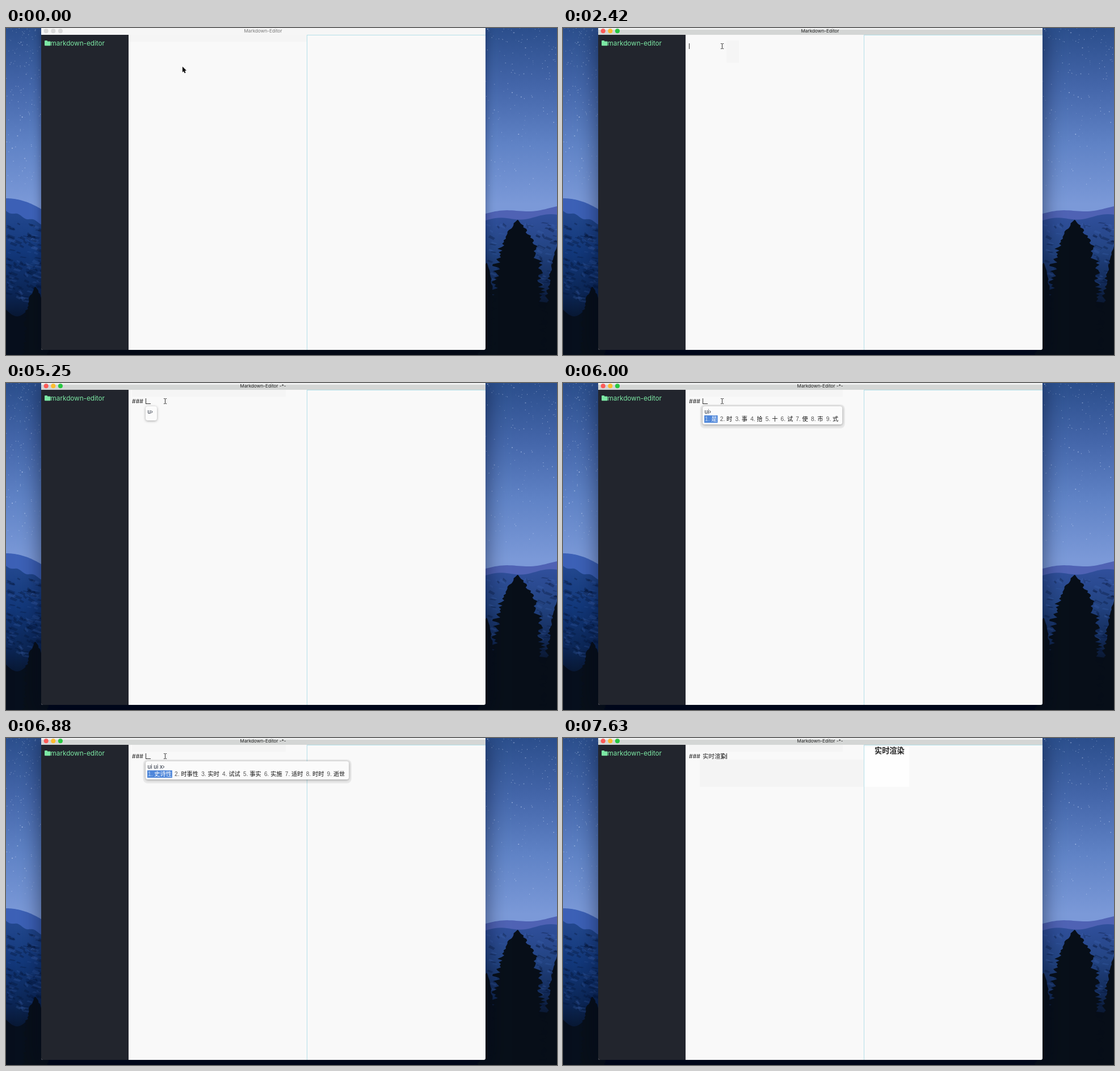
These frames come from a looping animation (971 px wide and 576 px high, 8000 ms). An HTML page with a canvas:

```html
<!DOCTYPE html>
<html lang="zh-CN">
<head>
<meta charset="utf-8">
<title>Markdown-Editor</title>
<style>
html, body { margin: 0; width: 100%; height: 100%; overflow: hidden; background: #050a14; }
canvas { display: block; }
</style>
</head>
<body>
<canvas id="stage" width="971" height="576"></canvas>
<script>
const LOOP = 8000;
const ctx = document.getElementById('stage').getContext('2d');
const UI = '"Liberation Sans", "Noto Sans CJK SC", "Noto Sans CJK", sans-serif';
const ROUND = 'Inter, "Noto Sans CJK SC", "Noto Sans CJK", sans-serif';

// Key moments in ms
const FOCUS = 150, ARRIVE = 790, HOVER = 1090, CLICK = 1380;
const TYPE = 2570, SPACE = 3170, COMPOSE = 5250, COMMIT = 7630;
const KEY_GAP = 150;
const HEADING = '实时渲染';

const pairs = '实时 试试 事实 实施 适时 时时 逝世';
const compositions = [
  [COMPOSE, 'u', ''],
  [5700, 'u', '是 上 说 时 事 谁 水 树 山'],
  [6000, 'ui', '是 时 事 拾 十 试 使 市 式'],
  [6290, 'ui u', `${pairs} 史诗 誓师`],
  [6440, 'ui ui', `${pairs} 史诗 誓师`],
  [6880, 'ui ui x', `史诗性 时事性 ${pairs}`],
  [7180, 'ui ui xr', `实时选 时事选 ${pairs}`],
  [7330, 'ui ui xr r', `${HEADING} ${pairs} 史诗`]
];

const clamp = (v, lo, hi) => Math.max(lo, Math.min(hi, v));

function seeded(seed) {
  return () => (seed = (seed * 16807) % 2147483647) / 2147483647;
}

function rect(color, x, y, w, h) {
  ctx.fillStyle = color;
  ctx.fillRect(x, y, w, h);
}

function rounded(color, x, y, w, h, r) {
  ctx.fillStyle = color;
  ctx.beginPath();
  ctx.roundRect(x, y, w, h, r);
  ctx.fill();
}

function poly(color, points) {
  ctx.fillStyle = color;
  ctx.beginPath();
  points.forEach(([x, y]) => ctx.lineTo(x, y));
  ctx.closePath();
  ctx.fill();
}

function text(string, x, y, font, color) {
  ctx.font = font;
  ctx.fillStyle = color;
  ctx.fillText(string, x, y);
}

function withShadow(color, blur, offset, paint) {
  ctx.save();
  ctx.shadowColor = color;
  ctx.shadowBlur = blur;
  ctx.shadowOffsetY = offset;
  paint();
  ctx.restore();
}

// Evenly spaced colour stops from top to bottom
function gradient(top, bottom, ...colors) {
  const g = ctx.createLinearGradient(0, top, 0, bottom);
  colors.forEach((color, i) => g.addColorStop(i / (colors.length - 1), color));
  return g;
}

// Fills everything below height(u), with u running 0..1 across the strip
function ridge(color, x, width, height) {
  const points = [[x + width, 576], [x, 576]];
  for (let i = 0; i <= 30; i++) points.push([x + width * i / 30, height(i / 30)]);
  poly(color, points);
}

function tree(random, x, top, maxHalf, reach) {
  const left = [], right = [];
  for (let y = top; y < 580; y += 3) {
    const half = 1 + maxHalf * (1 - Math.exp((top - y) / reach));
    left.unshift([x - half * (0.75 + random() * 0.4), y]);
    right.push([x + half * (0.75 + random() * 0.4), y + 1]);
  }
  poly('#070e18', [[x, top], ...right, ...left]);
}

function drawWallpaper() {
  const random = seeded(71);
  const anyX = i => i % 2 ? random() * 62 : 845 + random() * 126;

  rect(gradient(0, 310, '#2b4e8c', '#4466aa', '#6083c6', '#7b99d8'), 0, 0, 971, 330);
  for (let i = 0; i < 300; i++) {
    const size = random() < 0.15 ? 1.6 : 1;
    rect(`rgba(220,232,255,${0.15 + random() * 0.6})`, anyX(i), random() ** 1.5 * 285, size, size);
  }

  ridge('#3c60b6', 0, 62, u => 300 + 19 * u * u);
  ridge(gradient(322, 540, '#23488f', '#12377a', '#0b2555', '#050c18'), 0, 62, u => 322 + 22 * u + 2 * Math.sin(u * 14));
  ridge('#4f62b4', 845, 126, u => 327 - 11 * u - 3 * Math.sin(u * 7));
  ridge(gradient(330, 510, '#304f9b', '#234483', '#122a58', '#050b16'), 845, 126, u => 339 - 9 * u - 3 * Math.sin(u * 9));

  // Rock faces
  for (let i = 0; i < 260; i++) {
    const x = anyX(i), y = 342 + random() * 140;
    const w = 3 + random() * 10, h = 2 + random() * 8;
    poly(i % 3 ? 'rgba(4,16,48,.3)' : 'rgba(70,110,190,.2)',
      [[x, y], [x + w, y + h * 0.6], [x + w * 0.7, y + h], [x - w * 0.3, y + h * 0.5]]);
  }

  ridge('#060e1c', 0, 62, u => 496 + 12 * Math.sin(u * 5));
  ridge('#060d18', 845, 126, u => 470 + 16 * u);
  tree(random, 52, 456, 20, 30);
  tree(random, 847, 414, 14, 40);
  tree(random, 902, 338, 50, 52);
  tree(random, 972, 384, 24, 60);
}

function drawWindow(active, dirty) {
  const shade = `rgba(0,5,25,${active ? 0.55 : 0.4})`;
  withShadow(shade, active ? 38 : 18, active ? 10 : 5, () => rounded('#f9f9f9', 62, -8, 783, 575, 3));

  rect(active ? '#f0f1f1' : '#f6f6f6', 62, 0, 783, 3);
  rect(active ? '#d4d6d5' : '#f6f6f6', 62, 3, 783, 9);
  ['#fc5b57', '#fdbc2e', '#27c840'].forEach((color, i) =>
    rounded(active ? color : '#dadada', 66.7 + i * 12.6, 1.2, 8, 8, 4));
  ctx.textAlign = 'center';
  text('Markdown-Editor' + (dirty ? ' -*-' : ''), 453, 8.3, '8.2px ' + ROUND, active ? '#222' : '#777');
  ctx.textAlign = 'left';

  rounded('#22252d', 62, 12, 154, 555, [0, 0, 0, 3]);
  rounded('#7ce8a4', 68, 22, 5, 4, 1);
  rounded('#7ce8a4', 68, 23.5, 10.5, 7.8, 1);
  text('markdown-editor', 78.6, 31, '11.7px ' + ROUND, '#7ce8a4');
}

// Faint tints left on the page where things were repainted
function drawTints(t) {
  if (t < FOCUS) rect('#f5f5f5', 216, 12, 314, 12);
  if (t >= HOVER && t < COMPOSE) rect('#f5f5f5', 288, 22, 22, 39);
  if (t >= TYPE) rect('#f5f5f5', 222, 12, 271, t < COMPOSE ? 26 : 12);
  if (t >= COMMIT) {
    rect('#f4f4f4', 241, 38, 289, 48);
    rect('#fefefe', 531, 16, 79, 70);
  }
}

function drawPanes() {
  rect('#b3dfe9', 530, 12, 1, 555);
  rect('#b3dfe9', 530, 12, 315, 1);
}

function caretShown(t) {
  if (t < CLICK) return false;
  if (t >= COMPOSE || (t >= TYPE && t < SPACE)) return true;
  const idle = t - (t < TYPE ? CLICK : SPACE);
  return Math.floor((idle + 80) / 515) % 2 === 0;
}

function drawEditor(t) {
  const hashes = '#'.repeat(clamp(Math.floor((t - TYPE) / KEY_GAP) + 1, 0, 3));
  const words = t >= COMMIT ? HEADING : '';
  text(hashes, 222, 36, '10.5px ' + ROUND, '#222');
  text(words, 246, 36, '10.5px ' + UI, '#222');
  text(words, 549, 27, 'bold 13.2px ' + UI, '#222');
  if (caretShown(t)) {
    const x = t >= SPACE ? 246 + words.length * 10.5 : 222 + hashes.length * 6.6;
    rect('#333', Math.round(x), 27, 1, 10);
  }
}

function drawCandidates(keys, list) {
  const font = '10.2px ' + UI;
  const gap = 5.2;
  ctx.font = font;
  let x = 250;
  const items = list.split(' ').filter(Boolean).map((word, i) => {
    const label = `${i + 1}. `;
    const wordX = x + ctx.measureText(label).width;
    const end = wordX + ctx.measureText(word).width;
    const item = { label, word, x, wordX, end };
    x = end + gap;
    return item;
  });
  const full = items.length > 0;
  const width = full ? x - gap + 7 - 246 : 20;
  const height = full ? 32 : 25;

  rect('#333', 247, 36, 8, 1);
  if (full) rounded('rgba(0,0,0,.06)', 241.5, 38, width + 9, 42, 8);
  withShadow('rgba(0,0,0,.35)', 4, 1, () => rounded('#fbfbfb', 246, 41, width, height, 4));

  text(keys + '›', 249.5, 54, font, '#1c2433');
  if (full) rect('#4f87da', 249, 57, items[0].end - 248, 13);
  items.forEach((item, i) => {
    text(item.label, item.x, 67, font, i ? '#555' : '#c3d8f5');
    text(item.word, item.wordX, 67, font, i ? '#111' : '#fff');
  });
}

function drawBeam(x, y) {
  rect('#333', x, y - 4, 1, 8);
  for (const dx of [-2, 1]) for (const dy of [-5, 4]) rect('#333', x + dx, y + dy, 2, 1);
}

function drawArrow(x, y) {
  const shape = [[0, 0], [0, 10], [2.2, 8], [3.8, 11.6], [5.5, 10.8], [4, 7.3], [7, 7.1]];
  ctx.save();
  ctx.translate(x, y);
  ctx.strokeStyle = '#fff';
  poly('#000', shape);
  ctx.stroke();
  poly('#000', shape);
  ctx.restore();
}

function drawMouse(t) {
  if (t >= HOVER) return drawBeam(280, 32);
  // The pointer is refreshed in coarse ticks
  const p = Math.min(1, Math.floor(t / 200) * 200 / ARRIVE);
  drawArrow(311 - 32 * p ** 2, 68 - 48 * p ** 1.3);
}

function draw(now) {
  const t = now % LOOP;
  drawWallpaper();
  drawWindow(t >= FOCUS, t >= TYPE);
  drawTints(t);
  drawPanes();
  drawEditor(t);
  if (t >= COMPOSE && t < COMMIT) {
    const [, keys, list] = compositions.findLast(([start]) => t >= start);
    drawCandidates(keys, list);
  }
  drawMouse(t);
  requestAnimationFrame(draw);
}
requestAnimationFrame(draw);
</script>
</body>
</html>
```
